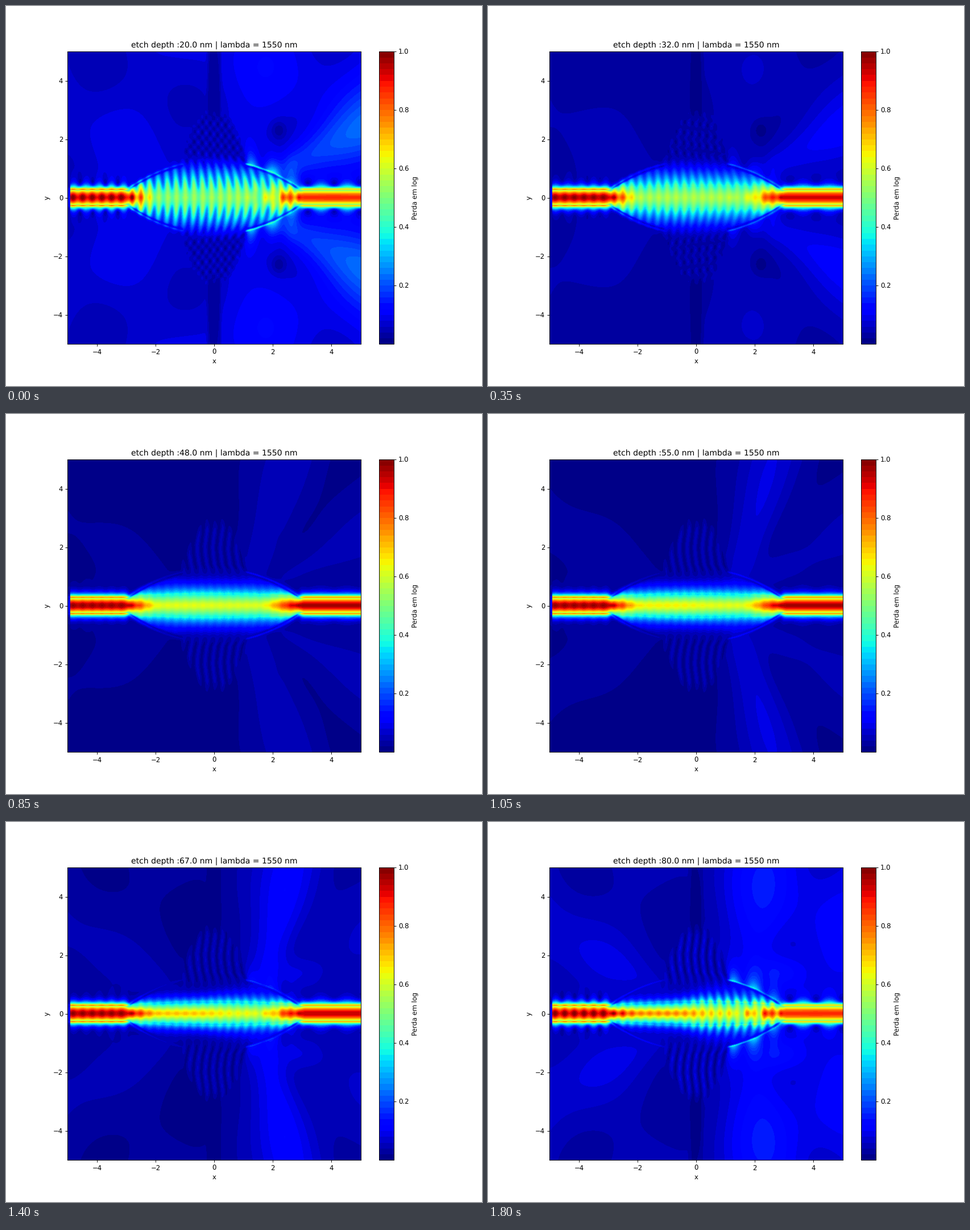
Write a matplotlib script that moves like this. It is 837x669 px and loops after 1.85 s.

```python
import numpy as np
import matplotlib.pyplot as plt
from matplotlib.animation import FuncAnimation
from matplotlib.colors import ListedColormap

W, H, DPI = 837, 669, 83.625
FRAMES, INTERVAL = 37, 50
TAU = 2 * np.pi
CORE = 0.27

plt.rcParams["text.hinting"] = "none"


def sig(u):
    return 1 / (1 + np.exp(-np.clip(u, -40, 40)))


def bell(u):
    return np.exp(-u * u)


def smooth(a, b, u):
    t = np.clip((u - a) / (b - a), 0, 1)
    return t * t * (3 - 2 * t)


def mix(a, b, k):
    return a + (b - a) * k


def lens(s):
    t = np.clip(3 - np.abs(s), 0, 3)
    return CORE + .69 * t - .1225 * t * t


# Upper half of the stage; the lower half is its mirror
X, Y = np.meshgrid(np.linspace(-5, 5, 515), np.linspace(0, 5, 258))
AX = np.abs(X)
HX, HY = lens(X), lens(Y)
RIGHT = sig(X / .3)
ANGLE = np.degrees(np.arctan2(Y, X - .4))

# Standing wave with curved fronts
BEND = .05 + .13 * sig(X / .4) + .3 * np.exp(-np.clip(X + 3, 0, 8) / .5)
WAVE = TAU / .3 * (X + BEND * np.minimum(Y, 1.4) ** 2 + .08)
FRONT = np.cos(WAVE)
OFF_AXIS = mix(.3, 1, smooth(.1, .5, Y))

# Straight guide and inner core
GUIDE = np.where(Y < CORE, np.cos(3.9 * Y), .88 * np.exp(-9 * (Y - CORE)))
BEADS = np.cos(TAU * (X + 4.49) / .33) * sig((-2.3 - X) / .15)
IN_LENS = sig((2.93 - AX) / .04)
INNER = CORE + .13 * np.clip(1 - (X / 3) ** 2, 0, 1)
RIM = np.where(Y > INNER, np.exp(-(Y - INNER) / .08), 0)

# Outline of the wide section
ABOVE = np.maximum(Y - HX, 0)
MASK = sig((HX - Y) / mix(.04, .18, sig((1.1 - AX) / .05)))
LEAK = mix(.3 * np.exp(-ABOVE / .2), 1, MASK)
FLANK = sig((AX - 1.08) / .02) * sig((2.9 - AX) / .05)
DARK_EDGE = 1 - .5 * FLANK * bell((Y - HX + .06) / .04)
GLINT = mix(.3, np.clip(1.2 - (X - 1.1) / 1.8, 0, 1), X > 0)
GLINT = GLINT * FLANK * bell((Y - HX) / .035)
GLOW = (np.exp(-ABOVE / .3) * (Y > HX) * (.6 + .4 * np.cos(TAU * (X - 2) / .75))
        * sig((X - 1.05) / .06) * sig((2.9 - X) / .15))
MOTTLE = (np.cos(TAU * X / .62 + .5) * np.cos(7 * Y)
          * sig((X - 1.3) / .1) * sig((2.7 - X) / .1))

# Beat between guided light and the surroundings, outside the core only
BEAT = np.where(X < 0, np.cos(TAU * (X + 4.36) / .43),
                -np.cos(TAU * (X - 3.2) / .9))
BEAT = BEAT * (1 - IN_LENS) * smooth(CORE, CORE + .15, Y)

# Vertical arm
ARM = sig((HY - AX) / .05) * sig((Y - 1.05) / .1) * sig((2.9 - Y) / .1)
CHECK = FRONT * np.cos(TAU * (Y + .15 * X) / .36)
SWAY = np.cos(WAVE + .9 * np.sin(4 * Y))
STEM = 1 - .55 * sig((.22 - AX) / .02) * sig((Y - 2.8) / .1)
BLOTCH = 1 + .35 * np.sin(1.1 * X + .4 * Y + 1) * np.cos(.9 * Y - .5 * X)


def surroundings(t, shallow, deep):
    q = t * t
    left = .012 + .055 * shallow ** 2 + .03 * deep ** 2
    right = .015 + .075 * q
    b = mix(left, right, sig((X - t) / .35)) * BLOTCH

    low = .03 * (1 - deep) + .085 * shallow ** 2
    b += low * sig((X - 2) / .3) * bell((ANGLE - 27) / 12)
    line = 1.7 + .4 * t + (.32 - .13 * t) * (Y - 2)
    steep = .075 * bell((t - .45) / .65)
    b += steep * bell((X - line) / (.45 + .12 * Y)) * sig((Y - .7) / .3)
    b += .07 * deep * bell((X - 2.9) / .8) * bell((Y - 1.4) / .6)
    b += (.008 + .024 * deep) * bell((ANGLE - 152) / 14) * sig((-1 - X) / .3)
    b -= .05 * shallow * bell((X - 2.2) / .25) * bell((Y - 2.3) / .3)
    b += .04 * np.exp(-Y / .5) * sig((AX - 2) / .3) + .25 * q * GLOW

    ripple = mix(SWAY, CHECK, .1 + .7 * shallow)
    b = mix(b, (.03 + .018 * q) * (1 + .8 * ripple), ARM)
    return np.maximum(b * STEM, .004)


def guided(t, shallow, deep):
    q = t * t
    middle = mix(.63 + .13 * t, .62 - .1 * shallow, sig((X - .2) / .3))
    axis = mix(.97 - .02 * q, middle, smooth(-3.1, -1.8, X))
    axis = mix(axis, .97 - .11 * q, smooth(1.5, 3, X))
    axis = axis + (.015 + .035 * q) * BEADS

    width = .65 * mix(np.exp(-.8 * t + .25 * q), np.exp(-.5 * t + .5 * q), RIGHT)
    width = 1 / np.sqrt(1 / width ** 2 + 1 / HX ** 2)
    stripe = mix(.04 + .32 * shallow ** 1.5 + .08 * deep, .04 + .28 * q, RIGHT)
    wide = np.exp(-(Y / width) ** 1.55) * (1 + stripe * OFF_AXIS * FRONT)
    wide *= (1 + .15 * q * MOTTLE) * (1 + .12 * (1 + t) * RIM)
    wide *= LEAK * DARK_EDGE
    e = axis * mix(GUIDE, wide, IN_LENS) + (.07 + .18 * q) * GLINT
    return np.where(X < -4.91, .12 * e, e)


def field(depth):
    # Scattering is lowest near 50 nm and grows to both sides
    t = (depth - 50) / 30
    sides = t, max(-t, 0), max(t, 0)
    e, b = guided(*sides), surroundings(*sides)
    beat = .2 + .7 * abs(t)
    f = np.sqrt(np.maximum(e * e + b * b + 2 * beat * e * b * BEAT, 0))
    f = np.clip(f, .001, .999)
    return np.vstack([f[:0:-1], f])


fig, ax = plt.subplots(figsize=(W / DPI + 1e-6, H / DPI + 1e-6), dpi=DPI)
jet50 = ListedColormap(plt.get_cmap("jet")((np.arange(50) + .5) / 50))
im = ax.imshow(field(20), cmap=jet50, vmin=0, vmax=1, origin="lower",
               extent=(-5, 5, -5, 5), interpolation="bilinear")
ax.set(xlabel="x", ylabel="y",
       xticks=range(-4, 5, 2), yticks=range(-4, 5, 2))
title = ax.set_title("")
fig.colorbar(im, ax=ax, label="Perda em log", ticks=np.arange(1, 6) / 5)


def update(i):
    depth = 20 + 60 * i / (FRAMES - 1)
    im.set_data(field(depth))
    title.set_text(f"etch depth :{round(depth):.1f} nm | lambda = 1550 nm")
    return im, title


anim = FuncAnimation(fig, update, frames=FRAMES, interval=INTERVAL,
                     repeat=True, repeat_delay=0, blit=False)
plt.show()
```
